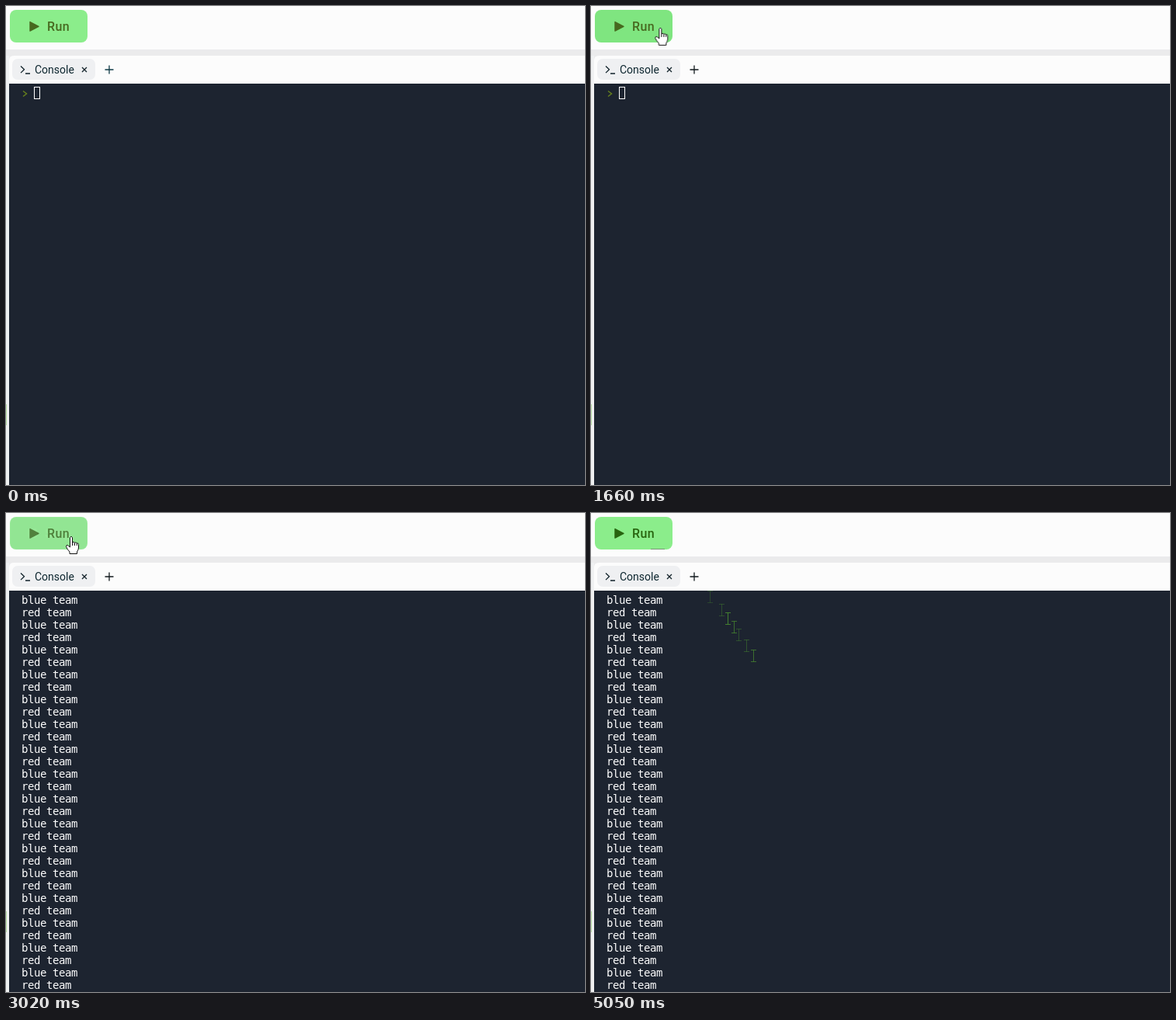
Write an HTML page that moves like this. It is 746 px wide and 617 px high and loops after 5.37 s.

```html
<!DOCTYPE html>
<html lang="en">
<head>
<meta charset="utf-8">
<title>Console run</title>
<style>
html, body { margin: 0; width: 100%; height: 100%; overflow: hidden; background: #fcfcfc; }
svg { position: absolute; left: 0; top: 0; width: 746px; height: 617px; }
svg * { animation: 5370ms linear infinite; }
.ui { font-family: Roboto, "Open Sans", sans-serif; }
#output {
  position: absolute; left: 20px; top: 104px; margin: 0;
  font: 14px/16px "DejaVu Sans Mono", monospace; letter-spacing: -.428px; color: #fff;
  animation: output 5370ms step-end infinite;
}

/* Button */
#run { animation-name: run; }
#runFace { animation-name: hover; }
#runInk { animation-name: ink; animation-timing-function: step-end; }
#stopFace { animation-name: disable; }
#stop { animation-name: stop; animation-timing-function: step-end; }
#residue { visibility: hidden; animation-name: residue; animation-timing-function: step-end; }
@keyframes run {
  0% { opacity: 1; animation-timing-function: step-end; }
  42.64%, 52.51% { opacity: 0; }
  57.17%, 100% { opacity: 1; }
}
@keyframes hover {
  0%, 28.3% { fill: #8bed8b; }
  31%, 60.1% { fill: #7fe580; }
  65%, 100% { fill: #8bed8b; }
}
@keyframes ink {
  0% { color: #47691f; }
  42.64%, 100% { color: #28640f; }
}
@keyframes stop {
  0% { visibility: hidden; }
  42.64% { visibility: visible; }
  57.17%, 100% { visibility: hidden; }
}
@keyframes disable {
  0%, 43.2% { fill: #36a313; }
  46.18%, 100% { fill: #e4e5e6; }
}
@keyframes residue {
  0% { visibility: hidden; }
  60.15%, 100% { visibility: visible; }
}

/* Console */
#plus { animation-name: plus; animation-timing-function: step-end; }
#prompt { animation-name: prompt; animation-timing-function: step-end; }
#block { animation-name: block; animation-timing-function: step-end; }
@keyframes plus {
  0% { stroke: #0e3a46; }
  26%, 100% { stroke: #11191d; }
}
@keyframes prompt {
  0% { visibility: visible; }
  49.34%, 100% { visibility: hidden; }
}
@keyframes block {
  0% { fill: transparent; }
  39.85% { fill: #fff; }
  43.57%, 100% { fill: transparent; }
}
@keyframes output {
  0% { visibility: hidden; }
  49.34%, 100% { visibility: visible; }
}

/* Pointer */
#pointer { animation-name: move; }
#pointer > * { visibility: hidden; animation-timing-function: step-end; }
#beam { animation-name: beam; }
#arrow { animation-name: arrow; }
#hand { animation-name: hand; }
#trail { animation: reveal 5370ms linear infinite; }
@keyframes move {
  0%, 2.793% { transform: translate(712px, 612px); }
  12.477% { transform: translate(412px, 314px); }
  22.719% { transform: translate(187px, 109px); }
  23.091% { transform: translate(178px, 102px); }
  26.071%, 26.443% { transform: translate(130px, 64px); }
  28.305% { transform: translate(104px, 42px); }
  32.775%, 37.616% { transform: translate(79px, 18px); }
  39.851%, 59.59% { transform: translate(84px, 30px); }
  62.011% { transform: translate(153px, 108px); }
  62.57% { transform: translate(168px, 125px); }
  62.942% { transform: translate(176px, 136px); }
  63.315% { transform: translate(184px, 147px); }
  63.687%, 65.54% { transform: translate(190px, 157px); }
  65.549% { transform: translate(200px, 171px); }
  65.922% { transform: translate(209px, 184px); }
  69.274% { transform: translate(261px, 250px); }
  79.516% { transform: translate(551px, 490px); }
  80.261%, 80.633% { transform: translate(573px, 505px); }
  89.572% { transform: translate(701px, 596px); }
  94.041%, 100% { transform: translate(724px, 618px); }
}
@keyframes beam {
  0% { visibility: hidden; }
  2.793% { visibility: visible; }
  23.09% { visibility: hidden; }
  61.7% { visibility: visible; }
  94.04%, 100% { visibility: hidden; }
}
@keyframes arrow {
  0% { visibility: hidden; }
  23.09% { visibility: visible; }
  28.3% { visibility: hidden; }
  60.15% { visibility: visible; }
  61.7%, 100% { visibility: hidden; }
}
@keyframes hand {
  0% { visibility: hidden; }
  28.3% { visibility: visible; }
  60.15%, 100% { visibility: hidden; }
}
/* Uncovers the trail just behind the moving beam */
@keyframes reveal {
  0%, 61.7% { clip-path: inset(0 746px 0 0); }
  62.011% { clip-path: inset(0 597px 0 0); }
  63.687%, 65.54% { clip-path: inset(0 558px 0 0); }
  65.922% { clip-path: inset(0 541px 0 0); }
  69.274%, 100% { clip-path: inset(0 489px 0 0); }
}
</style>
</head>
<body>
<svg class="ui" viewBox="0 0 746 617">
  <defs>
    <path id="beamShape" d="M-3 -7.5h7M.5 -7.5v15M-3 7.5h7" fill="none"/>
  </defs>
  <rect width="746" height="617" fill="#fcfcfc"/>
  <rect y="56" width="746" height="20" fill="#ebebec"/>
  <rect y="64" width="4" height="553" fill="#f0f1f2"/>
  <path d="M4 100V70q0-6 6-6h736v36z" fill="#fcfcfc"/>
  <rect x="4" y="100" width="742" height="517" fill="#1d2430"/>
  <rect y="513" width="1" height="27" fill="#b9dfa6"/>

  <g id="stop">
    <rect id="stopFace" x="6" y="6" width="98" height="40" rx="6"/>
    <rect x="28" y="20" width="12" height="12" rx="2" fill="#fcfcfc"/>
    <text x="50" y="32" font-size="16" font-weight="700" letter-spacing=".2" fill="#fcfcfc">Stop</text>
  </g>
  <g id="run">
    <rect id="runFace" x="5" y="5" width="100" height="42" rx="8"/>
    <g id="runInk" fill="currentColor">
      <path d="M31 20.5l11 5.8-11 5.8z" stroke="currentColor" stroke-width="1.4" stroke-linejoin="round"/>
      <text x="53" y="32" font-size="16" font-weight="500" letter-spacing=".4">Run</text>
    </g>
  </g>
  <path id="residue" d="M77 46.5h18" stroke="#779776"/>

  <rect x="8" y="68" width="107" height="27" rx="7" fill="#eff0f2"/>
  <g fill="none" stroke="#11222a" stroke-width="1.3">
    <path d="M19 77.5l4.5 4.3-4.5 4.3M25 87h6M98 79l6 6m0-6l-6 6"/>
    <path id="plus" d="M127.5 82h11M133 76.500v11"/>
  </g>
  <text x="37" y="86.500" font-size="14" fill="#0e2730">Console</text>

  <g id="prompt">
    <path d="M22 109.500l4.500 3.500-4.500 3.500" fill="none" stroke="#667f1d" stroke-width="1.500"/>
    <rect id="block" x="36.500" y="104.500" width="7" height="15" stroke="#fff"/>
  </g>
</svg>

<pre id="output"></pre>

<svg id="trail" viewBox="0 0 746 617" stroke="#4a8f30">
  <use href="#beamShape" x="153" y="108" opacity=".3"/>
  <use href="#beamShape" x="168" y="125" opacity=".4"/>
  <use href="#beamShape" x="176" y="136" opacity=".85"/>
  <use href="#beamShape" x="184" y="147" opacity=".7"/>
  <use href="#beamShape" x="190" y="157" opacity=".4"/>
  <use href="#beamShape" x="200" y="171" opacity=".45"/>
  <use href="#beamShape" x="209" y="184" opacity=".7"/>
</svg>

<svg viewBox="0 0 746 617">
  <g id="pointer" fill="#fff" stroke="#111" stroke-linejoin="round">
    <use id="beam" href="#beamShape" stroke="#fff"/>
    <path id="arrow" d="M.5 .5v16.500l4-3.700 2.700 6 2.600-1.200-2.700-5.800h5z"/>
    <g id="hand">
      <path d="M-1.500 1.500Q0-1 1.500 1.500V8Q3 6.500 4.500 8.300 6 7 7.300 9 9 8 9.500 10.500V15Q9 18 7.500 20v2.500H-2V20Q-5 17-6.500 13.500q0-2.500 2-2l3 2.500z"/>
      <path d="M1.500 8v4M4.500 8.500V12M7.300 9v3" fill="none"/>
    </g>
  </g>
</svg>
<script>
document.getElementById('output').textContent = 'blue team\nred team\n'.repeat(16);
</script>
</body>
</html>
```
